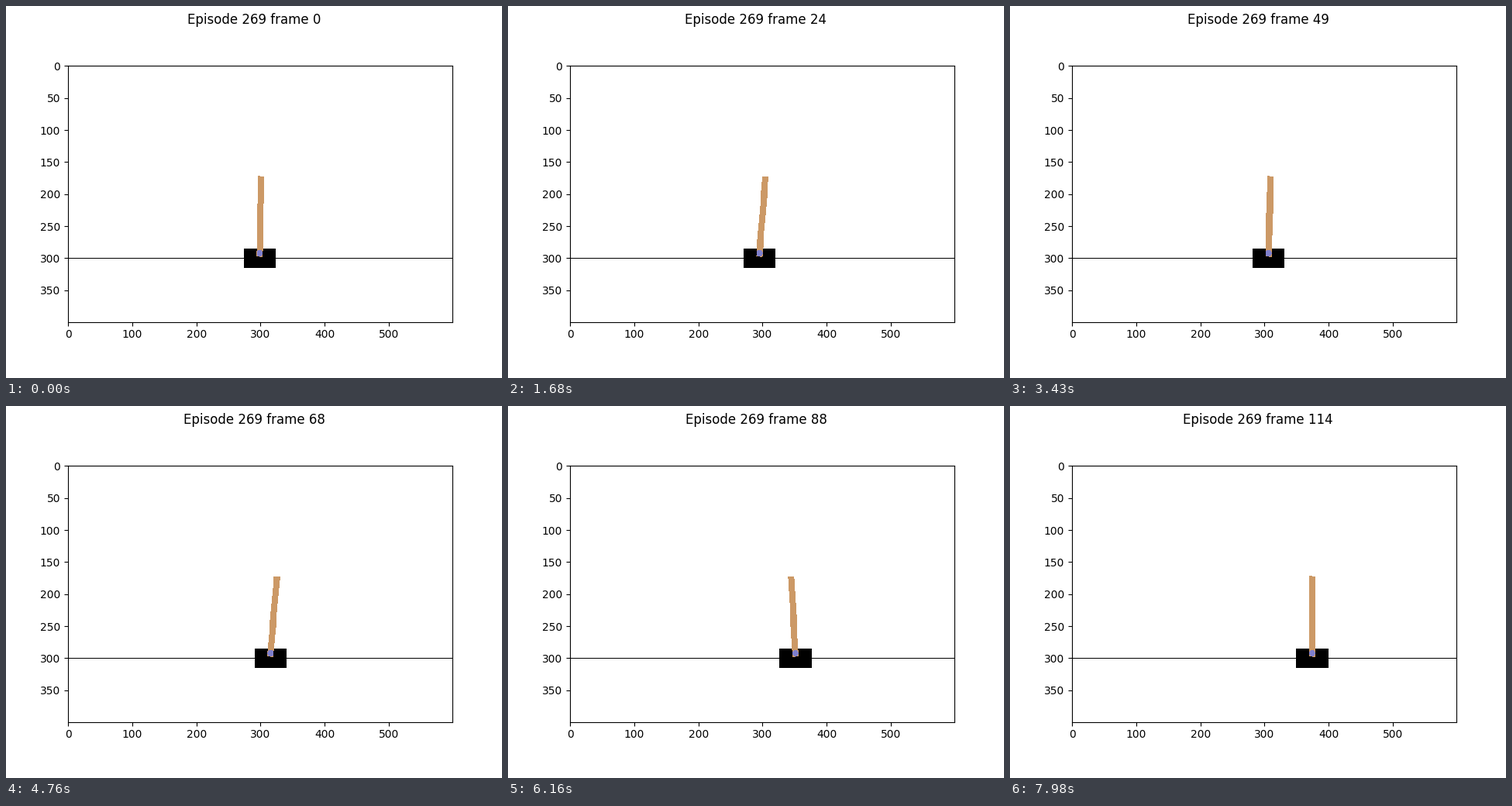
A matplotlib script for the animation above (8000 ms loop, 640 px wide and 480 px high).

```python
import numpy as np
import matplotlib.pyplot as plt
from matplotlib.animation import FuncAnimation

plt.rcParams["text.kerning_factor"] = 6  # whole-pixel letter spacing

WIDTH, HEIGHT = 600, 400
LOOP_MS, TICK_MS, STEP_MS = 8000, 20, 70
LAST_STEP = 114

WOOD = (204, 153, 102)
AXLE = (127, 127, 204)
BLACK = (0, 0, 0)

CART_W, CART_H, CART_Y = 50, 30, 300
POLE_W, POLE_LEN = 10, 125
AXLE_Y = CART_Y - CART_H / 4
LEVER = POLE_LEN * 2 / 3  # from the axle to the centre of oscillation

# Turning points of the pole's swing: (step, tilt in radians)
SWING = [(0, .0135), (13, -.006), (27, .088), (39, -.068),
         (59, .127), (86, -.055), (114, .003)]


def tilt_at(step):
    """Cosine easing from one turning point to the next."""
    for (t0, a), (t1, b) in zip(SWING, SWING[1:]):
        if step <= t1:
            ease = (1 - np.cos(np.pi * (step - t0) / (t1 - t0))) / 2
            return a + (b - a) * ease


def cart_at(step):
    """The centre of oscillation drifts right; the cart swings against the tilt."""
    drift = 300 + 90 / (1 + np.exp((86.3 - step) / 17.1))
    return drift - LEVER * tilt_at(step)


cols, rows = np.meshgrid(np.arange(WIDTH) + .5, np.arange(HEIGHT) + .5)


def render(step):
    cart, tilt = cart_at(step), tilt_at(step)
    img = np.full((HEIGHT, WIDTH, 3), 255, np.uint8)
    dx, up = cols - cart, AXLE_Y - rows
    across = dx * np.cos(tilt) - up * np.sin(tilt)
    along = dx * np.sin(tilt) + up * np.cos(tilt)
    half = POLE_W / 2
    img[(abs(dx) < CART_W / 2) & (abs(rows - CART_Y) < CART_H / 2)] = BLACK
    img[(abs(across) < half) & (along > -half) & (along < POLE_LEN - half)] = WOOD
    img[dx ** 2 + up ** 2 < half ** 2] = AXLE
    img[CART_Y] = BLACK
    return img


fig, ax = plt.subplots(figsize=(6.4, 4.8), dpi=100)
picture = ax.imshow(render(0), interpolation="nearest")
title = fig.suptitle("Episode 269 frame 0", y=.982)


def update(tick):
    step = min((tick * TICK_MS + TICK_MS // 2) // STEP_MS, LAST_STEP)
    picture.set_data(render(step))
    title.set_text(f"Episode 269 frame {step}")
    return picture, title


anim = FuncAnimation(fig, update, frames=LOOP_MS // TICK_MS, interval=TICK_MS,
                     init_func=lambda: update(0), repeat=True, repeat_delay=0)
plt.show()
```
